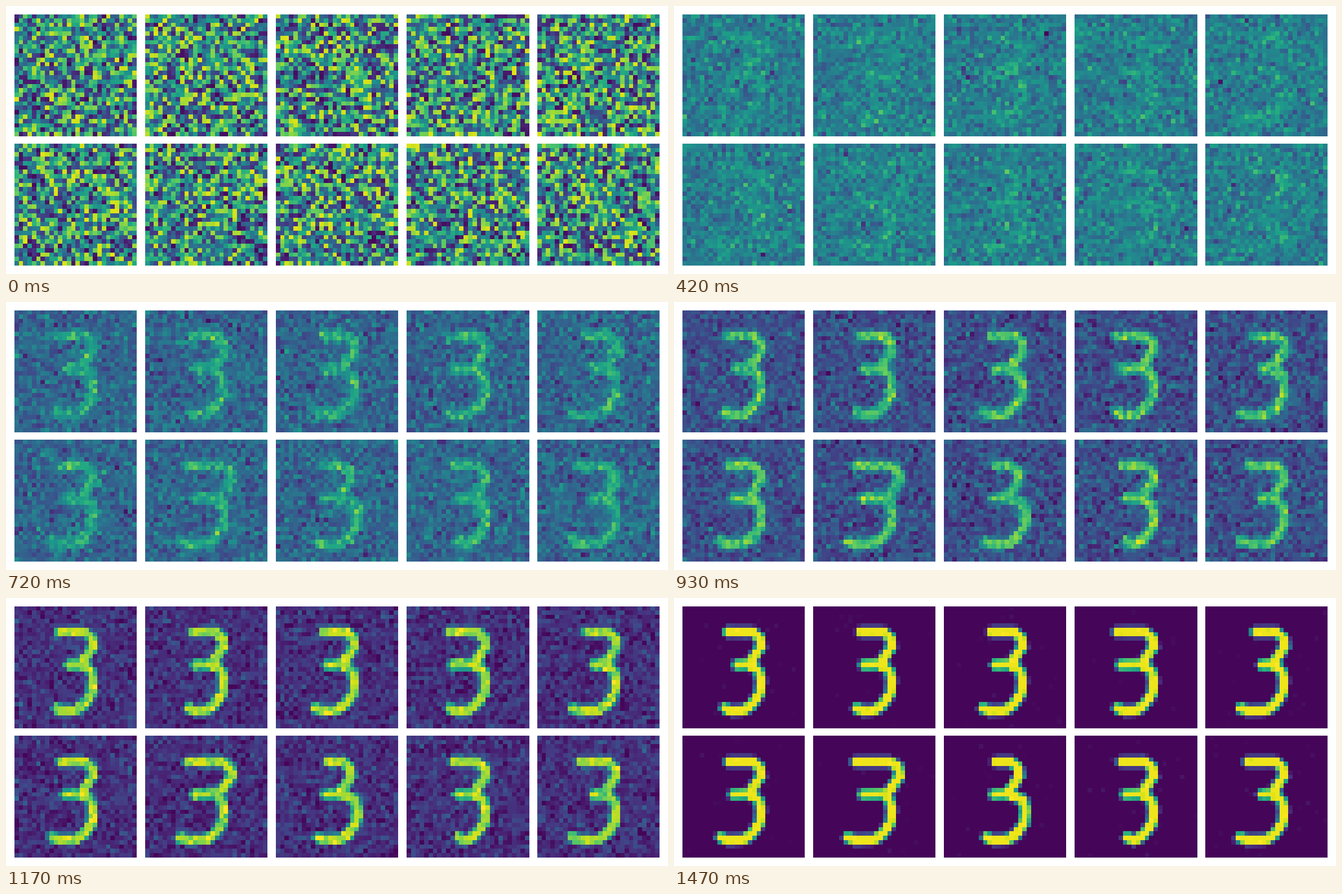
A matplotlib script that plays this animation: 1175 px wide and 477 px high, repeating every 1.5 s.

```python
import numpy as np
import matplotlib.pyplot as plt
from matplotlib.animation import FuncAnimation

W, H, DPI = 1175, 477, 64
FRAMES, STEP_MS = 50, 30
N = 28          # cells per panel side
SIDE = 217      # panel side in pixels
COLS, ROWS = 5, 2
KEEP = 0.87     # share of the noise carried to the next frame

# Each handwritten 3: left ends of its three arms, and how far it tilts right.
DIGITS = [
    (10.4, 12.6, 9.7, 0), (11, 11.7, 10, 0), (11, 11.8, 9, 0),
    (9.8, 10.6, 9.8, 0), (11.6, 13, 8.2, 0.2), (10.7, 11.7, 8.8, 0),
    (9.8, 11.5, 8, 1.8), (12, 11.5, 9.8, -0.7), (10.8, 11.6, 12, 0),
    (9.8, 13, 8, 0),
]


def three(top, mid, foot, tilt):
    """Pen path of a 3 in cell units, from the top arm to the foot."""
    up, low = 18 + tilt, 18 + max(0, -tilt)
    waist = (up - 3, 13.4)
    return [(top, 6), (up - 2, 6), (up - 0.3, 7.3), (up, 9.3), (up - 1.6, 11.7),
            waist, (mid, 13.5), waist,
            (low - 0.6, 14.7), (low, 17), (low - 0.3, 20), (low - 2, 22.5),
            (low - 4, 23.9), (foot + 1.5, 24), (foot, 23.4)]


def distance(path):
    """Distance from each cell centre to the pen path."""
    y, x = np.mgrid[:N, :N] + 0.5
    best = np.full((N, N), np.inf)
    for (ax, ay), (bx, by) in zip(path, path[1:]):
        dx, dy = bx - ax, by - ay
        t = np.clip(((x - ax) * dx + (y - ay) * dy) / (dx * dx + dy * dy), 0, 1)
        best = np.minimum(best, np.hypot(x - ax - t * dx, y - ay - t * dy))
    return best


def make_noise(rng):
    """Slowly changing unit noise that starts out uniform."""
    shape = (COLS * ROWS, N, N)
    noise = [(rng.random(shape) - 0.5) * np.sqrt(12)]
    for _ in range(FRAMES - 1):
        fresh = rng.standard_normal(shape)
        noise.append(KEEP * noise[-1] + np.sqrt(1 - KEEP ** 2) * fresh)
    return noise


def ease(t, start, end):
    return 1 - (1 - t ** start) ** end


dist = np.array([distance(three(*d)) for d in DIGITS])
crisp = np.clip((1.65 - dist) / 0.95, 0, 1)
soft = np.exp(-(dist / 1.5) ** 2)
halo = np.exp(-dist / 3)
noise = make_noise(np.random.default_rng(3))


def levels(k):
    """Cell values of all panels: paper and ink part while the noise fades."""
    t = k / (FRAMES - 1)
    paper = 0.49 - 0.477 * ease(t, 1.7, 1.2)
    ink = 0.49 + 0.485 * ease(t, 2.6, 2)
    sharp = np.clip((t - 0.2) / 0.6, 0, 1)
    mask = sharp * crisp + (1 - sharp) * soft
    spread = 0.09 - 0.06 * t ** 4 + 0.18 * np.exp(-k / 2.5)
    # Near the end only the strongest specks remain.
    cut = np.clip(10 * t - 9, 0, 1) * (2 - halo)
    grain = np.sign(noise[k]) * np.maximum(np.abs(noise[k]) - cut, 0)
    return np.clip(paper + (ink - paper) * mask + spread * grain, 0.013, 1)


fig = plt.figure(figsize=(W / DPI, H / DPI), dpi=DPI, facecolor="white")
images = []
for i in range(COLS * ROWS):
    left, top = 15 + 232 * (i % COLS), 15 + 230 * (i // COLS)
    ax = fig.add_axes([left / W, 1 - (top + SIDE) / H, SIDE / W, SIDE / H])
    ax.axis("off")
    images.append(ax.imshow(levels(0)[i], cmap="viridis", vmin=0, vmax=1,
                            interpolation="nearest", aspect="auto"))


def update(k):
    for image, data in zip(images, levels(k)):
        image.set_data(data)
    return images


anim = FuncAnimation(fig, update, frames=FRAMES, interval=STEP_MS,
                     repeat=True, repeat_delay=0, blit=False)
plt.show()
```
